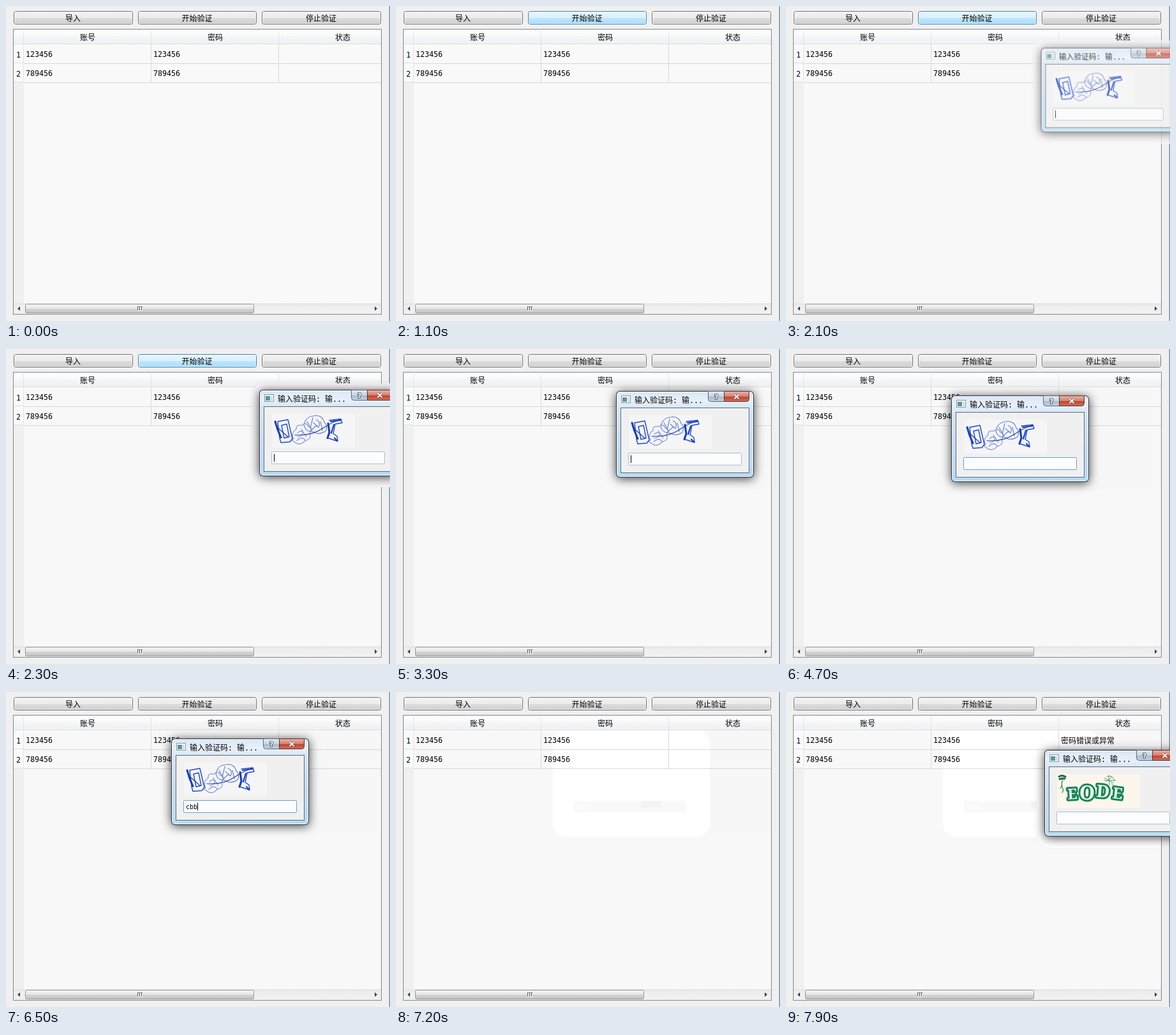
These frames come from a looping animation (602x495 px, 8000 ms). An HTML page with a canvas:

```html
<!DOCTYPE html>
<html lang="zh">
<head>
<meta charset="utf-8">
<style>
html, body { margin: 0; width: 100%; height: 100%; overflow: hidden; background: #f0f0f0; }
canvas { display: block; }
</style>
</head>
<body>
<canvas id="stage" width="602" height="495"></canvas>
<script>
const LOOP = 8000, STEP = 100;
const WIN_W = 216, WIN_H = 136, PAD = 30;
const CJK = '12px "Noto Sans CJK SC", "Noto Sans CJK", sans-serif';
const MONO = '11.63px "DejaVu Sans Mono", monospace';
const INPUT = '10px "DejaVu Sans Mono", monospace';

const stage = document.getElementById('stage').getContext('2d');
const layer = document.createElement('canvas');
layer.width = WIN_W + 2 * PAD;
layer.height = WIN_H + 2 * PAD;
const win = layer.getContext('2d');

const lerp = (a, b, k) => a + (b - a) * k;
const mix = (a, b, k) => `rgb(${a.map((v, i) => Math.round(lerp(v, b[i], k)))})`;

function rect(c, x, y, w, h, fill) {
  c.fillStyle = fill;
  c.fillRect(x, y, w, h);
}

function round(c, x, y, w, h, r, fill, stroke) {
  c.beginPath();
  c.roundRect(x, y, w, h, r);
  if (fill) { c.fillStyle = fill; c.fill(); }
  if (stroke) { c.lineWidth = 1; c.strokeStyle = stroke; c.stroke(); }
}

function shade(c, y0, y1, ...stops) {
  const g = c.createLinearGradient(0, y0, 0, y1);
  stops.forEach(([p, col]) => g.addColorStop(p, col));
  return g;
}

// Chinese and Latin runs use different fonts on one baseline.
function text(c, s, x, y, centred) {
  const runs = s.match(/[\x20-\x7e]+|[^\x20-\x7e]+/g) || [];
  const fontOf = r => r.charCodeAt(0) < 127 ? MONO : CJK;
  const width = r => { c.font = fontOf(r); return c.measureText(r).width; };
  if (centred) x -= runs.reduce((sum, r) => sum + width(r), 0) / 2;
  c.fillStyle = '#000';
  for (const r of runs) {
    const w = width(r);
    c.fillText(r, x, y);
    x += w;
  }
}

function button(x, w, label, hot = 0, down = false) {
  const c = stage;
  const tone = (cold, warm) => mix(cold, warm, hot);
  const fill = down
    ? shade(c, 8, 29, [0, '#d8eefa'], [.5, '#c0e2f5'], [.52, '#98d1ef'], [1, '#7fc2e6'])
    : shade(c, 8, 29,
      [0, tone([243, 243, 243], [234, 246, 253])], [.5, tone([235, 235, 235], [217, 240, 252])],
      [.52, tone([221, 221, 221], [190, 230, 253])], [1, tone([205, 205, 205], [167, 221, 250])]);
  round(c, x + .5, 8.5, w - 1, 20, 3, fill, down ? '#2c628b' : tone([112, 112, 112], [60, 127, 177]));
  round(c, x + 1.5, 9.5, w - 3, 18, 2, null, 'rgba(255,255,255,.7)');
  text(c, label, x + w / 2 - .5, 23.5, true);
}

function ghosts(t) {
  const c = stage;
  c.save();
  c.beginPath();
  c.rect(28, 61, 560, 406);
  c.clip();
  if (t >= 3300) round(c, 386, 40, 216, 180, 20, '#f7f7f7');
  if (t >= 7100) {
    round(c, 246, 60, 246, 168, 22, '#fff');
    rect(c, 279, 171, 176, 18, '#f9f9f9');
    rect(c, 384, 171, 33, 11, '#f4f4f4');
    c.font = INPUT;
    c.fillStyle = '#fff';
    c.fillText('cbb', 282, 184);
  }
  if (t >= 7700) round(c, 393, 82, 240, 163, 22, '#fff');
  c.restore();
}

function table(t) {
  const c = stage;
  rect(c, 11, 36, 578, 449, '#828790');
  rect(c, 12, 37, 576, 447, t < 2000 ? '#f9f9f9' : '#f8f8f8');
  rect(c, 12, 61, 16, 406, '#f0f0f0');
  ghosts(t);

  rect(c, 12, 37, 576, 23, shade(c, 37, 60, [0, '#fff'], [.45, '#f8f9fa'], [.5, '#f4f5f7'], [1, '#f0f1f3']));
  rect(c, 12, 59, 576, 1, '#dcdee1');
  for (const x of [27, 227, 427]) rect(c, x, 39, 1, 21, '#e2e4e7');
  ['账号', '密码', '状态'].forEach((s, i) => text(c, s, 128 + 200 * i, 53.5, true));

  ['123456', '789456'].forEach((s, i) => {
    const y = 60 + 30 * i;
    rect(c, 12, y, 16, 30, '#f9fafa');
    rect(c, 12, y + 29, 16, 1, '#dcdee1');
    rect(c, 27, y, 1, 30, '#e4e5e8');
    rect(c, 28, y + 30, 560, 1, '#d8d8d8');
    text(c, String(i + 1), 19.5, y + 21, true);
    text(c, s, 31, y + 20);
    text(c, s, 231, y + 20);
  });
  for (const x of [227, 427]) rect(c, x, 60, 1, 61, '#d8d8d8');
  if (t >= 7400) text(c, '密码错误或异常', 431, 80.5);
  scrollbar(c);
}

function arrow(c, x, dir) {
  c.fillStyle = '#404040';
  c.beginPath();
  c.moveTo(x + 2 * dir, 475.5);
  c.lineTo(x - 2 * dir, 472);
  c.lineTo(x - 2 * dir, 479);
  c.fill();
}

function scrollbar(c) {
  rect(c, 12, 467, 576, 17, shade(c, 467, 484, [0, '#e5e5e5'], [.3, '#eee'], [1, '#f2f2f2']));
  round(c, 30.5, 468.5, 358, 14, 2,
    shade(c, 468, 483, [0, '#f5f5f5'], [.48, '#e8e8e8'], [.52, '#d6d6d6'], [1, '#c0c0c0']), '#979797');
  for (let x = 206; x < 214; x += 3) {
    rect(c, x, 472, 2, 7, '#fafafa');
    rect(c, x, 472, 1, 6, '#555');
    rect(c, x, 472, 2, 1, '#555');
  }
  arrow(c, 20, -1);
  arrow(c, 580, 1);
}

function strokes(c, color, width, d) {
  c.strokeStyle = color;
  c.lineWidth = width;
  c.stroke(new Path2D(d));
}

function blueCode(c) {
  rect(c, 0, 0, 130, 53, '#f5f5f6');
  c.lineJoin = c.lineCap = 'round';
  strokes(c, '#8d9fe0', 1.3,
    'M34 39Q29 30 38 24Q37 16 47 18Q54 12 57 20Q65 22 59 31Q63 39 52 42Q43 52 34 43Q29 42 34 39' +
    'M40 30q6-6 9 0q-4 7-9 6M39 42q8-8 14 0M46 24l8 12');
  strokes(c, '#6d85d6', 1.2,
    'M50 17Q53 4 66 3Q78 1 82 13Q88 18 84 27Q74 34 64 28Q52 28 50 17M55 12l8 14M64 6l-4 17M69 9q8 3 4 12l-8-7M76 12l3 14M60 27l10-9');
  strokes(c, '#1f47cf', 1.4,
    'M9 12L25 9L32 39L28 44L14 45L12 38ZM15 18L23 16L27 36L19 38Z');
  strokes(c, '#123bc4', 3, 'M5 12L9 25L14 37M88 15L90 29L87 38');
  strokes(c, '#1f47cf', 1.4, 'M90 10L108 8L110 14L99 16L96 31L102 35L103 43L88 38');
  strokes(c, '#123bc4', 2.2, 'M92 12L107 10M97 17l-4 13M98 38l4 4');
  strokes(c, '#1938a8', 1.1, 'M7 20L25 36M36 33Q61 35 79 23T108 9');
}

function greenCode(c) {
  rect(c, 0, 0, 130, 53, '#fdf6ec');
  c.lineJoin = c.lineCap = 'round';
  c.textAlign = 'center';
  [['E', 24, 31, 23, -.06], ['O', 47, 29, 31, .05], ['D', 72, 27, 27, .08], ['E', 95, 30, 24, .12]]
    .forEach(([s, x, y, size, turn]) => {
      c.save();
      c.translate(x, y);
      c.rotate(turn);
      c.font = `bold ${size}px "Noto Serif", serif`;
      c.strokeStyle = '#16855a';
      c.lineWidth = 6;
      c.strokeText(s, 0, size * .36);
      c.fillStyle = '#eef5e8';
      c.fillText(s, 0, size * .36);
      c.restore();
    });
  c.textAlign = 'left';
  strokes(c, '#176b4b', 3, 'M3 4q4-3 10 0M4 8q5-2 8-1');
  strokes(c, '#27805e', 1.2, 'M9 9Q5 17 10 25M8 18l-3 4M10 25l-2 4');
  strokes(c, '#4e9b7b', 1, 'M74 6l14 8M77 12l9-8M81 2l1 15M74 10h18M85 15l5 4M78 4q8-4 12 6');
}

function frame(c) {
  c.save();
  c.shadowColor = 'rgba(0,0,0,.75)';
  c.shadowBlur = 16;
  c.shadowOffsetY = 2;
  round(c, 0, 0, WIN_W, WIN_H, 6, '#2c3640');
  c.restore();
  round(c, 1, 1, WIN_W - 2, WIN_H - 2, 5, '#f4faff');
  round(c, 2, 2, WIN_W - 4, WIN_H - 4, 4,
    shade(c, 2, WIN_H, [0, '#dce8f5'], [.1, '#e6f0fa'], [.2, '#d5e5f5'], [.6, '#c6dcf2'], [1, '#b6dcf4']));
  rect(c, 7, 26, 202, 103, '#5e6b78');
  rect(c, 8, 27, 200, 101, '#f0f0f0');

  rect(c, 8, 7, 15, 12, '#8b969f');
  rect(c, 9, 8, 13, 10, '#f7f9fa');
  rect(c, 10, 10, 7, 7, shade(c, 10, 17, [0, '#5d8fa6'], [1, '#52a17f']));
  rect(c, 18, 10, 3, 7, '#d5dce2');
  text(c, '输入验证码: 输...', 29, 18.5);

  round(c, 144.5, .5, 25, 16, [0, 0, 0, 4],
    shade(c, 1, 17, [0, '#e1e9f1'], [.48, '#c9d5e1'], [.52, '#a9bacb'], [1, '#c6d8e8']), '#59697a');
  round(c, 169.5, .5, 39, 16, [0, 0, 4, 0],
    shade(c, 1, 17, [0, '#e8b1a6'], [.48, '#d47c6f'], [.52, '#bc4332'], [1, '#d67559']), '#61302c');
  c.font = 'bold 11px "DejaVu Sans", sans-serif';
  c.lineWidth = 2;
  c.strokeStyle = '#5b6773';
  c.strokeText('?', 154, 13);
  c.fillStyle = '#fff';
  c.fillText('?', 154, 13);
  c.lineCap = 'butt';
  strokes(c, '#70413d', 3.6, 'M185.5 5.5l7 6.5m0-6.5l-7 6.5');
  strokes(c, '#fff', 2.2, 'M185.5 5.5l7 6.5m0-6.5l-7 6.5');
}

function dialog({ x, y, alpha, code, typed = '', caret = false, focus = 0 }) {
  const c = win;
  c.clearRect(0, 0, layer.width, layer.height);
  c.save();
  c.translate(PAD, PAD);
  frame(c);
  c.save();
  c.translate(20, 38);
  code(c);
  c.restore();
  round(c, 19.5, 97.5, 177, 19, 1, '#fcfcfd', mix([172, 190, 207], [104, 160, 207], focus));
  c.font = INPUT;
  c.fillStyle = '#000';
  c.fillText(typed, 23, 111);
  if (caret) rect(c, 23 + Math.round(c.measureText(typed).width), 101, 1, 12, '#000');
  c.restore();

  const s = lerp(.92, 1, alpha);
  stage.save();
  stage.globalAlpha = alpha;
  stage.translate(x + WIN_W / 2, y + WIN_H / 2);
  stage.scale(s, s);
  stage.drawImage(layer, -WIN_W / 2 - PAD, -WIN_H / 2 - PAD);
  stage.restore();
}

// Last value whose start time has passed.
const at = (t, keys) => keys.reduce((v, [start, val]) => t >= start ? val : v, keys[0][1]);

const HOT = [[0, 0], [500, .5], [600, 1], [2500, .85], [2800, .55], [3000, .25], [3200, 0]];
const DRAG = [[0, [397, 64]], [3200, [387, 64]], [3300, [345, 66]], [3400, [259, 73]]];
const TYPED = [[0, ''], [5200, 'c'], [5400, 'cb'], [6500, 'cbb']];
const CARET = [[0, true], [2800, false], [3200, true], [3800, false], [4300, true],
  [4700, false], [5200, true], [6100, false], [6500, true]];
const FADE = [[0, 0], [2000, .3], [2100, .7], [2200, .92], [2300, 1], [7100, .4], [7200, 0]];
const FADE2 = [[0, 0], [7700, .35], [7800, .8], [7900, 1]];

function draw(t) {
  rect(stage, 0, 0, 602, 495, '#f0f0f0');
  rect(stage, 600, 0, 1, 495, '#c9d2dc');
  rect(stage, 601, 0, 1, 495, '#6f7f90');
  button(12, 187, '导入');
  button(207, 186, '开始验证', at(t, HOT), t >= 800 && t < 900);
  button(401, 187, '停止验证');
  table(t);

  const alpha = at(t, FADE);
  if (alpha) {
    const [x, y] = at(t, DRAG);
    if (t < 3200) {
      stage.globalAlpha = alpha;
      round(stage, 386, 54, 240, 163, 18, '#faf7fa');
      stage.globalAlpha = 1;
    }
    dialog({
      x, y, alpha, code: blueCode,
      typed: at(t, TYPED), caret: at(t, CARET),
      focus: Math.min(1, Math.max(0, (t - 3500) / 300))
    });
  }
  const alpha2 = at(t, FADE2);
  if (alpha2) dialog({ x: 405, y: 91, alpha: alpha2, code: greenCode });
}

const start = performance.now();
function tick() {
  const t = (performance.now() - start) % LOOP;
  draw(Math.floor(t / STEP) * STEP);
  requestAnimationFrame(tick);
}
tick();
</script>
</body>
</html>
```
